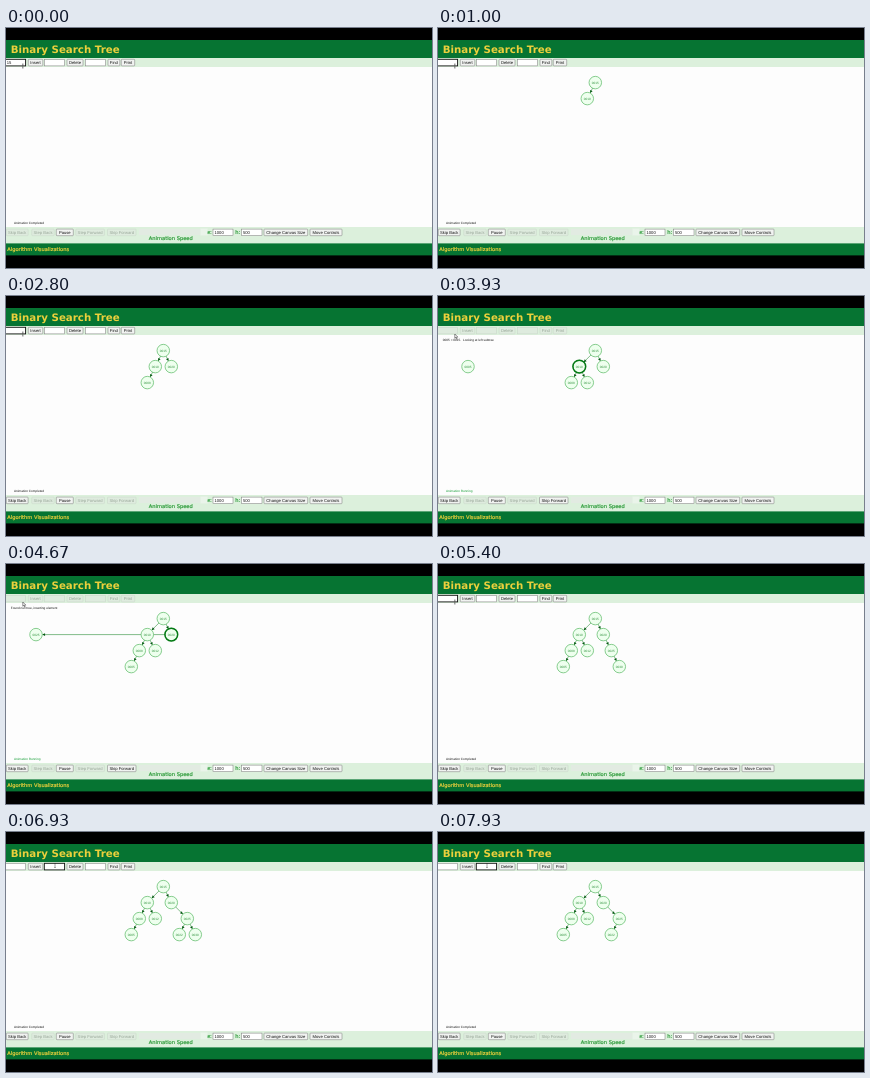
Recreate the animation shown at these times as an HTML page. Size 426 by 240 pixels, loop 8000 ms.

```html
<!DOCTYPE html>
<html lang="en">
<head>
<meta charset="utf-8">
<title>Binary Search Tree</title>
<style>
html, body { margin: 0; width: 100%; height: 100%; overflow: hidden; background: #000; }
svg { display: block; width: 100%; height: 100%; }
text { text-rendering: geometricPrecision; white-space: pre; }
.page { font-family: "DejaVu Sans", sans-serif; font-size: 5.15px; stroke-width: .2; }
.title { font-size: 10.25px; font-weight: bold; }
.yellow { fill: #ecd03c; }
.footer { stroke: #ecd03c; }
.speed { fill: #2f9c3c; stroke: #2f9c3c; }
.ui { font-family: "Liberation Sans", Arial, sans-serif; font-size: 4.16px; }
.small { font-family: "Liberation Sans", Arial, sans-serif; font-size: 3.15px; }
.mid { text-anchor: middle; }
</style>
</head>
<body>
<svg id="stage" viewBox="0 0 426 240">
  <rect width="426" height="240" fill="#000"/>
  <rect y="30" width="426" height="185" fill="#fdfdfd"/>
  <rect y="12" width="426" height="18" fill="#067432"/>
  <rect y="30" width="426" height="9" fill="#dcf0dc"/>
  <rect y="199" width="426" height="17" fill="#dcf0dc"/>
  <rect y="215.4" width="426" height="12" fill="#067432"/>
  <text x="4.7" y="24.6" class="page title yellow">Binary Search Tree</text>
  <text x="1.2" y="223.2" class="page yellow footer">Algorithm Visualizations</text>
  <text x="142.8" y="212.2" class="page speed">Animation Speed</text>
  <text x="200" y="206.2" class="page speed">w:</text>
  <text x="229.2" y="206.2" class="page speed">h:</text>
  <rect x="133" y="201" width="61.5" height="6" fill="#e2ebe2"/>
  <rect x="194.5" y="200.5" width="7" height="7" fill="#eaf4ea"/>
  <g id="controls"></g>
  <g id="edges"></g>
  <g id="nodes"></g>
  <circle id="ring" r="6.4" fill="none" stroke="#067a16" stroke-width="1.5"/>
  <text id="message" x="4.8" y="44.6" class="small" fill="#111"></text>
  <text id="status" x="8" y="195.6" class="small"></text>
  <path id="beam" d="M-.8 -2H.8M0 -2V2M-.8 2H.8" fill="none" stroke="#333" stroke-width=".45"/>
  <path id="arrow" d="M0 0V4.2L1 3.3L1.7 4.8L2.3 4.5L1.7 3.1H3Z" fill="#fff" stroke="#111" stroke-width=".45"/>
</svg>
<script>
const LOOP = 8000, HALF = 8, LEVEL = 16, RADIUS = 6.25;
const ROOT = { x: 157.3, y: 54.6 }, START = { x: 30, y: 70.6 };
const GREEN = "#067a16";

const $ = id => document.getElementById(id);
const clamp = v => Math.max(0, Math.min(1, v));
const mix = (a, b, u) => a + (b - a) * u;
const between = (a, b, u) => ({ x: mix(a.x, b.x, u), y: mix(a.y, b.y, u) });
const pad = key => String(key).padStart(4, "0");

function el(tag, parent, attrs) {
  const node = document.createElementNS("http://www.w3.org/2000/svg", tag);
  parent.append(node);
  return set(node, attrs);
}
function set(node, attrs) {
  for (const name in attrs) node.setAttribute(name, attrs[name]);
  return node;
}
const show = (node, on) => node.setAttribute("visibility", on ? "visible" : "hidden");
const write = (node, text) => { if (node.textContent !== text) node.textContent = text; };

// Tree layout
function search(keys, key) {
  const path = [];
  let lo = -Infinity, hi = Infinity;
  for (const k of keys) {
    if (k <= lo || k >= hi) continue;
    path.push(k);
    if (k === key) break;
    if (key < k) hi = k; else lo = k;
  }
  return path;
}

function layout(keys) {
  const build = list => {
    if (!list.length) return null;
    const key = list[0];
    const left = build(list.filter(k => k < key));
    const right = build(list.filter(k => k > key));
    const width = n => n ? Math.max(n.lw + n.rw, HALF) : HALF;
    return { key, left, right, lw: width(left), rw: width(right) };
  };
  const places = new Map();
  const place = (n, x, y, parent) => {
    if (!n) return;
    places.set(n.key, { x, y, parent });
    if (n.left) place(n.left, x - n.left.rw, y + LEVEL, n.key);
    if (n.right) place(n.right, x + n.right.lw, y + LEVEL, n.key);
  };
  place(build(keys), ROOT.x, ROOT.y, null);
  return places;
}

// Operations: key, start, end
const ops = [
  [15, -80, 300], [10, 300, 950], [20, 950, 1800], [8, 1800, 2740],
  [12, 2800, 3500], [5, 3500, 4250], [25, 4250, 4800], [30, 4800, 5370],
  [22, 5450, 6600], [30, 6950, 7900, true]
].map(([key, start, end, remove]) => ({ key, start, end, remove }));

let keys = [];
for (const op of ops) {
  op.path = search(keys, op.key);
  op.before = layout(keys);
  keys = op.remove ? keys.filter(k => k !== op.key) : [...keys, op.key];
  op.after = layout(keys);
}

// Controls
const controls = $("controls");
function box(x, y, w, label, isField) {
  const rect = el("rect", controls, { x, y, width: w, height: 6.6, rx: isField ? 0 : .7 });
  const text = el("text", controls, {
    x: isField ? x + 1.5 : x + w / 2, y: y + 4.9, class: isField ? "ui" : "ui mid"
  });
  text.textContent = label;
  const item = { rect, text, isField };
  style(item, true);
  return item;
}
function style({ rect, text, isField }, on, focus) {
  set(rect, {
    fill: on ? (isField ? "#fff" : "#f1f3f1") : "#deebde",
    stroke: focus ? "#111" : on ? "#777" : "#c6d4c6",
    "stroke-width": focus ? .9 : .5
  });
  text.setAttribute("fill", on ? "#111" : "#98a698");
}
const field = (x, y, w, label = "") => box(x, y, w, label, true);

const TOP = 31.3, LOW = 201.1;
const insertField = field(-.7, TOP, 20.3), deleteField = field(38.3, TOP, 20.3);
const topRow = [
  insertField, box(22.3, TOP, 14.5, "Insert"),
  deleteField, box(61, TOP, 16, "Delete"),
  field(79.3, TOP, 20.3), box(102, TOP, 11.8, "Find"), box(115.3, TOP, 13.4, "Print")
];
const skipBack = box(.3, LOW, 21.8, "Skip Back");
const stepBack = box(25.8, LOW, 22.4, "Step Back");
box(50.3, LOW, 17, "Pause");
const stepForward = box(69.8, LOW, 28.6, "Step Forward");
const skipForward = box(101.5, LOW, 28.5, "Skip Forward");
field(207, LOW, 20, "1000");
field(235.5, LOW, 20.5, "500");
box(258, LOW, 43.7, "Change Canvas Size");
box(304, LOW, 32, "Move Controls");
style(stepBack, false);
style(stepForward, false);

// One reusable circle and edge per key
const parts = new Map();
for (const { key } of ops) {
  if (parts.has(key)) continue;
  const group = el("g", $("nodes"));
  el("circle", group, { r: RADIUS, fill: "#eeffee", stroke: "#62bd6c", "stroke-width": .75 });
  el("text", group, { y: 1.15, class: "small mid", fill: "#2c8f3a" }).textContent = pad(key);
  const line = el("path", $("edges"), { stroke: GREEN, "stroke-width": .5, fill: "none" });
  const head = el("path", $("edges"), { d: "M0 0L-2.8 -1.4V1.4Z", fill: "#055a12" });
  parts.set(key, { group, line, head });
}

function drawTree(places) {
  for (const [key, part] of parts) {
    const p = places.get(key);
    const parent = p && places.get(p.parent);
    show(part.group, p);
    show(part.line, parent);
    show(part.head, parent);
    if (p) part.group.setAttribute("transform", `translate(${p.x} ${p.y})`);
    if (!parent) continue;
    const angle = Math.atan2(p.y - parent.y, p.x - parent.x);
    const tip = { x: p.x - RADIUS * Math.cos(angle), y: p.y - RADIUS * Math.sin(angle) };
    part.line.setAttribute("d", `M${parent.x} ${parent.y}L${tip.x} ${tip.y}`);
    part.head.setAttribute("transform",
      `translate(${tip.x} ${tip.y}) rotate(${angle * 180 / Math.PI})`);
  }
}

function compareText({ key }, node) {
  if (key === node) return "Node to delete is a leaf.  Delete it.";
  const less = key < node;
  return `${pad(key)} ${less ? "<" : ">"} ${pad(node)}.  Looking at ${less ? "left" : "right"} subtree`;
}

const TYPE = .1, RUN = .25, WALK = .34, MOVE = .8, DONE = .97;

// State of the tree, message and highlight ring at progress u of an operation
function progress(op, u) {
  const view = { places: op.before, message: "", ring: null };
  if (u < RUN) return view;
  if (u >= DONE) return { ...view, places: op.after };

  const count = op.path.length;
  const pos = clamp((u - WALK) / (MOVE - WALK)) * count;
  const i = Math.min(count - 1, Math.floor(pos));
  const local = pos - i;
  const shift = clamp((u - MOVE) / (DONE - MOVE - .02));
  const walking = u >= WALK && u < MOVE;
  const linked = u >= MOVE || (i === count - 1 && local > .8);

  view.message = `${op.remove ? "Deleting" : "Inserting"} ${pad(op.key)}`;
  if (!count) return { ...view, places: op.after };
  if (walking) {
    const seen = local > .6 ? i : i - 1;
    if (seen >= 0) view.message = compareText(op, op.path[seen]);
    if (i > 0) {
      const [from, to] = [op.path[i - 1], op.path[i]].map(k => op.before.get(k));
      view.ring = between(from, to, clamp(local / .4));
    }
  }
  if (linked) view.message = op.remove ? compareText(op, op.key) : "Found null tree, inserting element";

  const target = u >= MOVE || !op.remove ? op.after : op.before;
  view.places = new Map();
  for (const [key, p] of target) {
    const from = op.before.get(key) || START;
    const parent = key === op.key && !op.remove && !linked ? null : p.parent;
    view.places.set(key, { ...between(from, p, shift), parent });
  }
  return view;
}

function render(t) {
  const op = ops.filter(o => o.start <= t).pop();
  const u = (t - op.start) / (op.end - op.start);
  const running = u >= RUN && u < DONE;
  const deleting = t >= 6650;
  const view = progress(op, u);

  drawTree(view.places);
  write($("message"), view.message);
  show($("ring"), view.ring);
  if (view.ring) set($("ring"), { cx: view.ring.x, cy: view.ring.y });

  write($("status"), running ? "Animation Running" : "Animation Completed");
  $("status").setAttribute("fill", running ? "#0b9a2e" : "#111");

  const active = deleting ? deleteField : insertField;
  for (const item of topRow) style(item, !running, !running && item === active);
  style(skipBack, t >= 70);
  style(skipForward, running);

  const typed = u < TYPE || u >= RUN ? "" :
    String(op.key).slice(0, u < TYPE + .06 ? 1 : 2);
  write(insertField.text, op.remove ? "" : typed);
  write(deleteField.text, op.remove ? typed : "");

  const travel = clamp((t - 6600) / 200);
  const mouse = between({ x: 16.8, y: 38 }, { x: 49, y: 33.5 }, travel);
  const place = `translate(${mouse.x} ${mouse.y})`;
  $("beam").setAttribute("transform", place);
  $("arrow").setAttribute("transform", place);
  show($("beam"), !running);
  show($("arrow"), running);
}

const origin = performance.now();
function tick() {
  render((performance.now() - origin) % LOOP);
  requestAnimationFrame(tick);
}
render(0);
requestAnimationFrame(tick);
</script>
</body>
</html>
```
